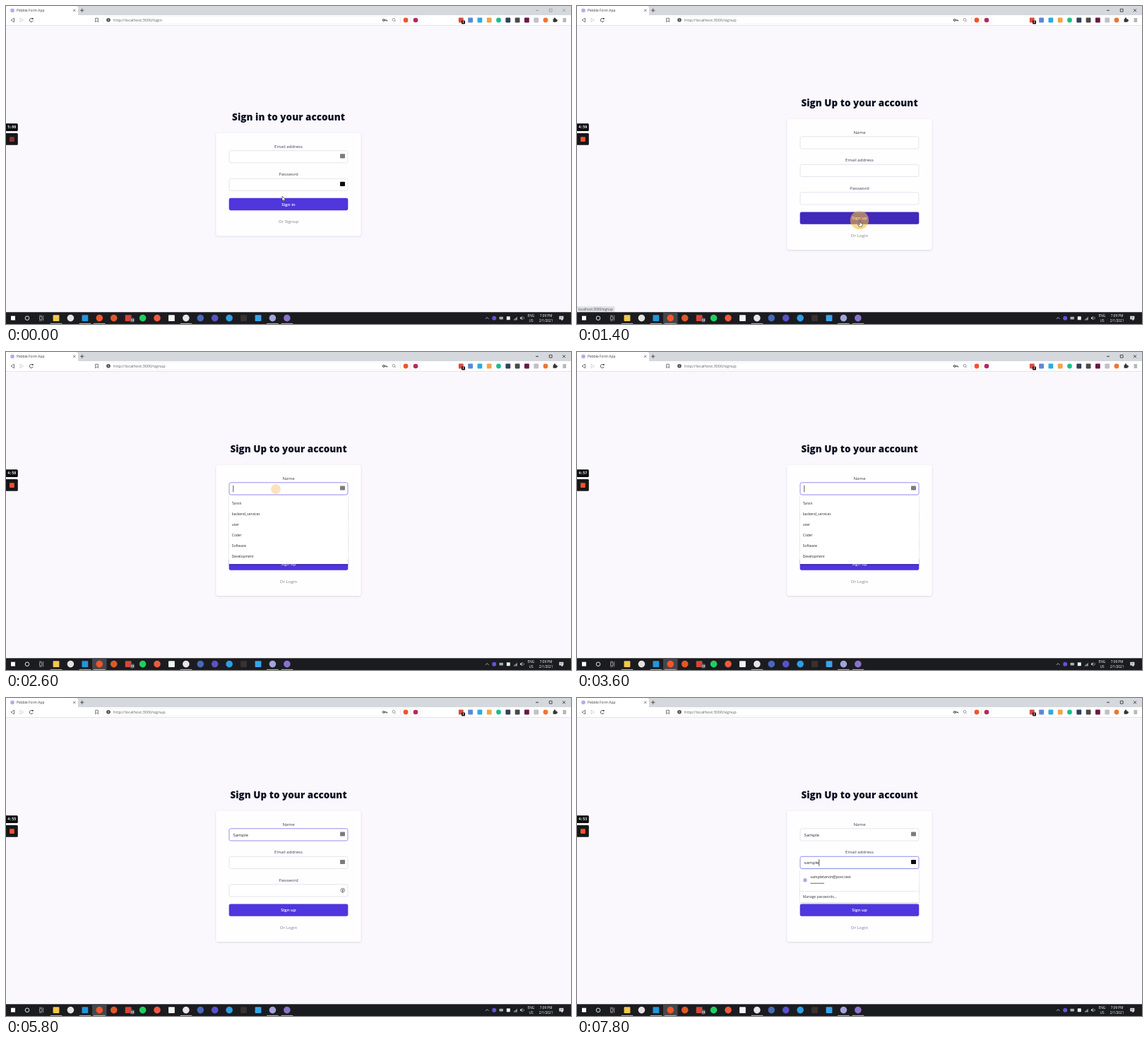
Animation, 800 px wide and 450 px high, one loop 8000 ms. Source, as an HTML page with a canvas:

```html
<!DOCTYPE html>
<html lang="en">
<head>
<meta charset="utf-8">
<title>Sign up flow</title>
<style>
html, body { margin: 0; width: 100%; height: 100%; overflow: hidden; background: #faf8fd; }
canvas { display: block; width: 800px; height: 450px; }
</style>
</head>
<body>
<canvas id="stage"></canvas>
<script>
const LOOP = 8000, STEP = 200;
const canvas = document.getElementById('stage');
const ctx = canvas.getContext('2d');
const dpr = window.devicePixelRatio || 1;
canvas.width = 800 * dpr;
canvas.height = 450 * dpr;

const SANS = '"Open Sans", "Noto Sans", sans-serif';
const MONO = '"DejaVu Sans Mono", monospace';
const INDIGO = '#4f36dd';

// Times of the clicks and key presses
const OPEN_SIGNUP = 1400, FOCUS_NAME = 2400, FOCUS_EMAIL = 6400;
const NAME_KEYS = [4000, 4400, 4600, 4800, 5000, 5200];
const EMAIL_KEYS = [6800, 7000, 7200, 7400, 7600, 7800];
const CLICKS = [[OPEN_SIGNUP, 400, 303], [FOCUS_NAME, 382, 194], [FOCUS_EMAIL, 401, 228]];
const POINTER = [[0, 391, 269], [200, 391, 271], [800, 400, 304], [1400, 400, 304],
  [1600, 399, 296], [2200, 382, 194], [5800, 382, 194], [6200, 401, 228], [8000, 401, 228]];
const HISTORY = ['Tarvin', 'backend_services', 'user', 'Coder', 'Software', 'Development'];
const ACCOUNTS = [['tarvinoley40271@post.test', 13], ['sampletarvin@post.test', 9]];

function rect(x, y, w, h, fill, r = 0) {
  ctx.fillStyle = fill;
  ctx.beginPath();
  ctx.roundRect(x, y, w, h, r);
  ctx.fill();
}

function box(x, y, w, h, stroke, r = 0, width = 0.7) {
  ctx.strokeStyle = stroke;
  ctx.lineWidth = width;
  ctx.beginPath();
  ctx.roundRect(x, y, w, h, r);
  ctx.stroke();
}

function disc(x, y, r, fill) {
  ctx.fillStyle = fill;
  ctx.beginPath();
  ctx.arc(x, y, r, 0, Math.PI * 2);
  ctx.fill();
}

function ring(x, y, r, stroke, width = 0.8, from = 0, to = Math.PI * 2) {
  ctx.strokeStyle = stroke;
  ctx.lineWidth = width;
  ctx.beginPath();
  ctx.arc(x, y, r, from, to);
  ctx.stroke();
}

function line(points, stroke, width = 0.8, close = false) {
  ctx.strokeStyle = stroke;
  ctx.lineWidth = width;
  ctx.beginPath();
  points.forEach(([x, y]) => ctx.lineTo(x, y));
  if (close) ctx.closePath();
  ctx.stroke();
}

function cross(x, y, r, color) {
  line([[x - r, y - r], [x + r, y + r]], color, 0.7);
  line([[x - r, y + r], [x + r, y - r]], color, 0.7);
}

// y is the middle of the capitals; shaping at 10x keeps small advances exact
function text(str, x, y, size, color, { align = 'left', weight = 400, font = SANS } = {}) {
  ctx.save();
  ctx.translate(x, y + size * 0.36);
  ctx.scale(0.1, 0.1);
  ctx.font = `${weight} ${size * 10}px ${font}`;
  ctx.textAlign = align;
  ctx.fillStyle = color;
  ctx.fillText(str, 0, 0);
  const width = ctx.measureText(str).width / 10;
  ctx.restore();
  return width;
}

const center = (str, x, y, size, color, weight = 400) =>
  text(str, x, y, size, color, { align: 'center', weight });

function shadowed(blur, dy, color, draw) {
  ctx.save();
  ctx.shadowBlur = blur * dpr;
  ctx.shadowOffsetY = dy * dpr;
  ctx.shadowColor = color;
  draw();
  ctx.restore();
}

function badge(kind, x, y, r, color) {
  if (kind === 'o') disc(x, y, r, color);
  else rect(x - r, y - r, 2 * r, 2 * r, color, 0.8);
}

function drawBrowser(signup, active) {
  rect(0, 0, 800, 13, '#d5d8dd');
  rect(0, 0, 102, 13, '#fff', [0, 3, 0, 0]);
  disc(9, 6.2, 2.8, '#b7a9ee');
  text('Pebble Form App', 15, 6.3, 4.9, '#3c4043');
  cross(96.7, 6.2, 1.6, '#444');
  line([[105, 6.2], [110.4, 6.2]], '#333');
  line([[107.7, 3.5], [107.7, 8.9]], '#333');

  const ctl = active ? '#111' : '#8b8e93';
  line([[750, 6.2], [754, 6.2]], ctl);
  box(769.3, 4.2, 3.8, 3.8, ctl);
  cross(790, 6.2, 2, ctl);

  rect(0, 13, 800, 14.5, '#fff');
  rect(0, 27, 800, 0.7, '#dcdce2');
  line([[11.5, 17.2], [11.5, 22.8], [7, 20]], '#444', 0.7, true);
  line([[20, 17.2], [20, 22.8], [24.5, 20]], '#c3c3c8', 0.7, true);
  ring(35.8, 20, 2.5, '#333', 0.8, 0.3, 5.4);
  rect(36.8, 17, 1.8, 1.8, '#333');
  line([[126.6, 17.3], [130.4, 17.3], [130.4, 22.7], [128.5, 21], [126.6, 22.7]], '#444', 0.7, true);

  box(138, 14.8, 449, 10.4, '#e6e6eb', 2, 0.5);
  disc(145, 19.8, 2.8, '#4a4c50');
  rect(144.6, 19.3, 0.8, 2, '#fff');
  rect(144.6, 18, 0.8, 0.7, '#fff');
  text('http://localhost:3000/' + (signup ? 'signup' : 'login'), 152, 20, 5.6, '#5c5f66');
  ring(534.8, 20, 1.4, '#333', 1);
  line([[536, 20], [539.4, 20], [539.4, 21.6]], '#333', 1);
  ring(549, 19.4, 1.9, '#777', 0.7);
  line([[550.4, 20.8], [552, 22.4]], '#777', 0.7);
  rect(558, 16, 0.5, 8, '#d0d0d5');
  disc(566, 20, 3.4, '#f2542c');
  rect(572.6, 16, 0.5, 8, '#d0d0d5');
  disc(580, 20, 3.3, '#b5295c');

  [['s', '#dd4a3d'], ['s', '#5b87d8'], ['s', '#2fa9e0'], ['s', '#f3a24b'], ['o', '#18c08b'],
   ['s', '#33405a'], ['s', '#4a4a4a'], ['s', '#6b1747'], ['s', '#bfc1c6'], ['o', '#ee7435']]
    .forEach(([kind, color], i) => badge(kind, 644.3 + i * 13.3, 20, 3.4, color));
  rect(645, 20.5, 5, 5, '#111', 0.8);
  center('2', 647.5, 23, 4, '#fff', 700);
  rect(774.6, 18.2, 5, 4.6, '#333', 0.5);
  disc(777, 17.8, 1.2, '#333');
  disc(779.8, 20.4, 1.2, '#333');
  for (const y of [18, 20, 22]) rect(788.5, y - 0.35, 4.6, 0.7, '#333');
}

function drawTaskbar(active) {
  rect(0, 433.3, 800, 16.7, '#1b1c20');
  if (active) rect(122, 433.3, 20.5, 16.7, '#43464b');
  rect(7, 438.6, 6, 6, '#fff');
  ring(30, 441.7, 2.8, '#fff', 0.9);
  box(47.5, 439.8, 3.4, 3.8, '#ddd', 0, 0.6);
  line([[47, 438.2], [51, 438.2]], '#ddd', 0.6);
  line([[47, 445.2], [51, 445.2]], '#ddd', 0.6);
  line([[52.7, 438], [52.7, 445.4]], '#ddd', 0.6);

  [['s', '#f3c84b'], ['o', '#e4e2df'], ['s', '#2296dd'], ['o', '#f4552b'], ['o', '#dd5a28'],
   ['s', '#db4437'], ['o', '#1ed05f'], ['o', '#ef5a3c'], ['s', '#f4f4f4'], ['o', '#e9e5ec'],
   ['o', '#4869b8'], ['o', '#5a52c8'], ['o', '#2b9fe6'], ['s', '#39322f'], ['s', '#38a4ea'],
   ['o', '#a3a4d8'], ['o', '#8a72cf']]
    .forEach(([kind, color], i) => badge(kind, 71 + i * 20.43, 441.6, kind === 'o' ? 4.8 : 4.4, color));
  disc(178.8, 444.4, 3.3, '#555a60');
  center('13', 178.8, 444.4, 4, '#fff', 700);
  for (const x of [71, 112, 132.2, 255, 377.4, 398]) rect(x - 8.3, 448.9, 16.6, 1.1, '#78b6e8');

  line([[679, 442.8], [681.2, 440.6], [683.4, 442.8]], '#eee', 0.7);
  disc(691.2, 441.7, 3, '#6652d9');
  rect(698.5, 439.8, 5.4, 3.6, '#aab0b4', 0.6);
  rect(708.8, 439.2, 5, 5, '#f0f0f0', 0.6);
  for (let i = 0; i < 4; i++) rect(719.2 + i * 1.3, 443.6 - i * 1.3, 0.8, 1 + i * 1.3, i < 3 ? '#eee' : '#999');
  rect(728, 440.6, 1.6, 2.2, '#eee');
  line([[729.4, 440.8], [730.8, 439.4], [730.8, 444], [729.4, 442.6]], '#eee', 0.6);
  ring(731, 441.7, 2.3, '#ddd', 0.6, -0.8, 0.8);
  center('ENG', 743.4, 438.2, 4.7, '#fff');
  center('US', 743.6, 445.2, 4.7, '#fff');
  center('7:09 PM', 764.6, 438.2, 4.7, '#fff');
  center('2/1/2021', 764.6, 445.2, 4.7, '#fff');
  rect(783.3, 438.8, 6, 4.6, '#f2f2f2');
  rect(786.5, 443, 1.6, 1.8, '#f2f2f2');
  line([[784.4, 440.3], [788.2, 440.3]], '#333', 0.5);
  line([[784.4, 441.8], [788.2, 441.8]], '#333', 0.5);
}

function drawRecorder(t) {
  const left = 300 - Math.floor(t / 1000);
  const label = Math.floor(left / 60) + ':' + String(left % 60).padStart(2, '0');
  rect(0, 166.3, 16.8, 10.6, '#0d0d10', [0, 1.5, 1.5, 0]);
  text(label, 8.2, 171.6, 4.9, '#fff', { align: 'center', weight: 700, font: MONO });
  rect(0, 180, 16.8, 16.8, '#17171a', [0, 1.5, 1.5, 0]);
  rect(5, 185.2, 6.8, 6.8, t < 400 ? '#8c3430' : '#f4512f', 0.8);
}

const typed = (word, keys, t) => word.slice(0, keys.filter(k => k <= t).length);

function field(label, top, { value = '', border = '#d9d8e6', icon, caret }) {
  center(label, 400, top - 6.3, 6.15, '#374151', 500);
  rect(316, top, 168, 17.2, '#fff', 2.4);
  box(316, top, 168, 17.2, border, 2.4, border === '#d9d8e6' ? 0.7 : 1);
  const width = text(value, 321.5, top + 8.9, 6.2, '#23252f');
  if (caret) rect(321.5 + width, top + 4, 0.7, 9.4, '#111');
  if (icon === 'ring') {
    ring(476.8, top + 8.2, 2.8, '#555', 0.7);
    disc(476.8, top + 7.6, 1, '#555');
    rect(476.4, top + 8, 0.8, 4, '#555');
  } else if (icon) {
    rect(473, top + 4.6, 7, 6.2, icon, 0.8);
  }
}

function drawForm(t, signup, pointer) {
  const top = signup ? 159.5 : 179.4;
  const count = signup ? 3 : 2;
  center(signup ? 'Sign Up to your account' : 'Sign in to your account', 400, top - 22.6, 13.5, '#0d1020', 800);
  shadowed(2.5, 0.7, 'rgba(40,30,80,.18)', () => rect(297.3, top, 205.4, 67 + 39.5 * count, '#fffeff', 3.6));

  const fieldTop = i => top + 25.3 + 39.5 * i;
  const onName = signup && t >= FOCUS_NAME && t < FOCUS_EMAIL;
  const onEmail = signup && t >= FOCUS_EMAIL;
  const lastEvent = [FOCUS_NAME, ...NAME_KEYS, FOCUS_EMAIL, ...EMAIL_KEYS].filter(k => k <= t).pop() || 0;
  const blink = (t - lastEvent) % 1000 < 500;
  const ready = t >= OPEN_SIGNUP + 200;
  const grey = '#7b7b80';

  if (signup) {
    field('Name', fieldTop(0), {
      value: typed('Sample', NAME_KEYS, t), icon: ready && grey,
      border: onName ? '#9d8ced' : undefined, caret: onName && blink });
    field('Email address', fieldTop(1), {
      value: typed('sample', EMAIL_KEYS, t), icon: ready && (onEmail ? '#0c0c0c' : grey),
      border: onEmail ? '#8f93e6' : undefined, caret: onEmail && blink });
    field('Password', fieldTop(2), { icon: ready && 'ring' });
  } else {
    field('Email address', fieldTop(0), { icon: grey });
    field('Password', fieldTop(1), { icon: '#0c0c0c' });
  }

  const by = fieldTop(count) - 11.9;
  const hover = t >= 200 && pointer.y > by && pointer.y < by + 17.4;
  rect(315.7, by, 168.6, 17.4, hover ? '#4029bb' : INDIGO, 2.4);
  center(signup ? 'Sign up' : 'Sign in', 400, by + 8.9, 6.1, '#fff', 600);
  center(signup ? 'Or Login' : 'Or Signup', 400, by + 33.4, 6.15, '#7a7f8c');
}

function panel(y, h) {
  shadowed(2, 0.8, 'rgba(0,0,0,.3)', () => rect(315.6, y, 168.8, h, '#fff'));
}

function drawHistory(rows) {
  panel(203, rows.length * 15 + 7);
  rows.forEach((row, i) => text(row, 319.8, 214 + i * 15, 4.9, '#25262b'));
}

function drawAccounts(rows) {
  const end = 248.8 + rows.length * 24.2;
  panel(242.3, end - 242.3 + 16.6);
  rows.forEach(([mail, dots], i) => {
    const y = 253.2 + i * 24.2;
    disc(323, y + 4.6, 2.7, '#b1a8e6');
    text(mail, 330.5, y, 5.2, '#25262b');
    for (let d = 0; d < dots; d++) disc(331.6 + d * 2.18, y + 9, 0.75, '#333');
  });
  rect(315.6, end, 168.8, 0.5, '#d5d5dc');
  text('Manage passwords...', 319.8, end + 8.7, 4.9, '#33343a');
}

function pointerAt(t) {
  const i = Math.max(1, POINTER.findIndex(p => p[0] > t));
  const [t0, x0, y0] = POINTER[i - 1], [t1, x1, y1] = POINTER[i];
  const k = (t - t0) / (t1 - t0);
  const e = k * k * (3 - 2 * k);
  return { x: x0 + (x1 - x0) * e, y: y0 + (y1 - y0) * e };
}

function drawShape(x, y, points) {
  ctx.beginPath();
  points.forEach(([px, py]) => ctx.lineTo(x + px, y + py));
  ctx.closePath();
  ctx.fillStyle = '#fff';
  ctx.fill();
  ctx.strokeStyle = '#222';
  ctx.lineWidth = 0.6;
  ctx.stroke();
}

function drawPointer(t, { x, y }) {
  const hand = t >= 800 && t <= OPEN_SIGNUP + 200;
  const resting = (t >= 2200 && t <= 5800) || t >= 6200;
  if (resting) return;
  if (hand) {
    drawShape(x, y, [[0, 0], [1.2, 0], [1.2, 3], [4, 3.8], [4, 6.4], [3.2, 8.2], [-0.6, 8.2],
      [-2.4, 5.2], [-1.6, 4.6], [0, 5.8]]);
  } else {
    drawShape(x, y, [[0, 0], [0, 7], [1.6, 5.6], [2.7, 8], [3.8, 7.5], [2.8, 5.2], [4.9, 5]]);
  }
}

function drawClicks(t) {
  for (const [time, x, y] of CLICKS) {
    const age = t - time;
    if (age === 0) disc(x, y, 13.2, 'rgba(246,192,62,.58)');
    else if (age === STEP) disc(x, y, 7, 'rgba(245,178,82,.36)');
  }
}

function draw(t) {
  const signup = t >= OPEN_SIGNUP;
  const pointer = pointerAt(t);
  ctx.setTransform(dpr, 0, 0, dpr, 0, 0);
  rect(0, 0, 800, 450, '#faf8fd');
  drawBrowser(signup, signup);
  drawForm(t, signup, pointer);

  if (t >= FOCUS_NAME && t < NAME_KEYS[0]) drawHistory(HISTORY);
  else if (t >= NAME_KEYS[0] && t < NAME_KEYS[1]) drawHistory(['Software']);
  if (t >= FOCUS_EMAIL) drawAccounts(t < EMAIL_KEYS[0] ? ACCOUNTS : ACCOUNTS.slice(1));

  if (t >= 800 && t <= OPEN_SIGNUP) {
    rect(0, 425, 53.5, 8.3, '#dfe1e6', [0, 1.5, 0, 0]);
    text('localhost:3000/signup', 1.8, 429.3, 4.8, '#4b4e54');
  }
  drawRecorder(t);
  drawTaskbar(signup);
  drawClicks(t);
  drawPointer(t, pointer);
}

function tick() {
  const t = performance.now() % LOOP;
  draw(Math.floor(t / STEP) * STEP);
  requestAnimationFrame(tick);
}
tick();
</script>
</body>
</html>
```
